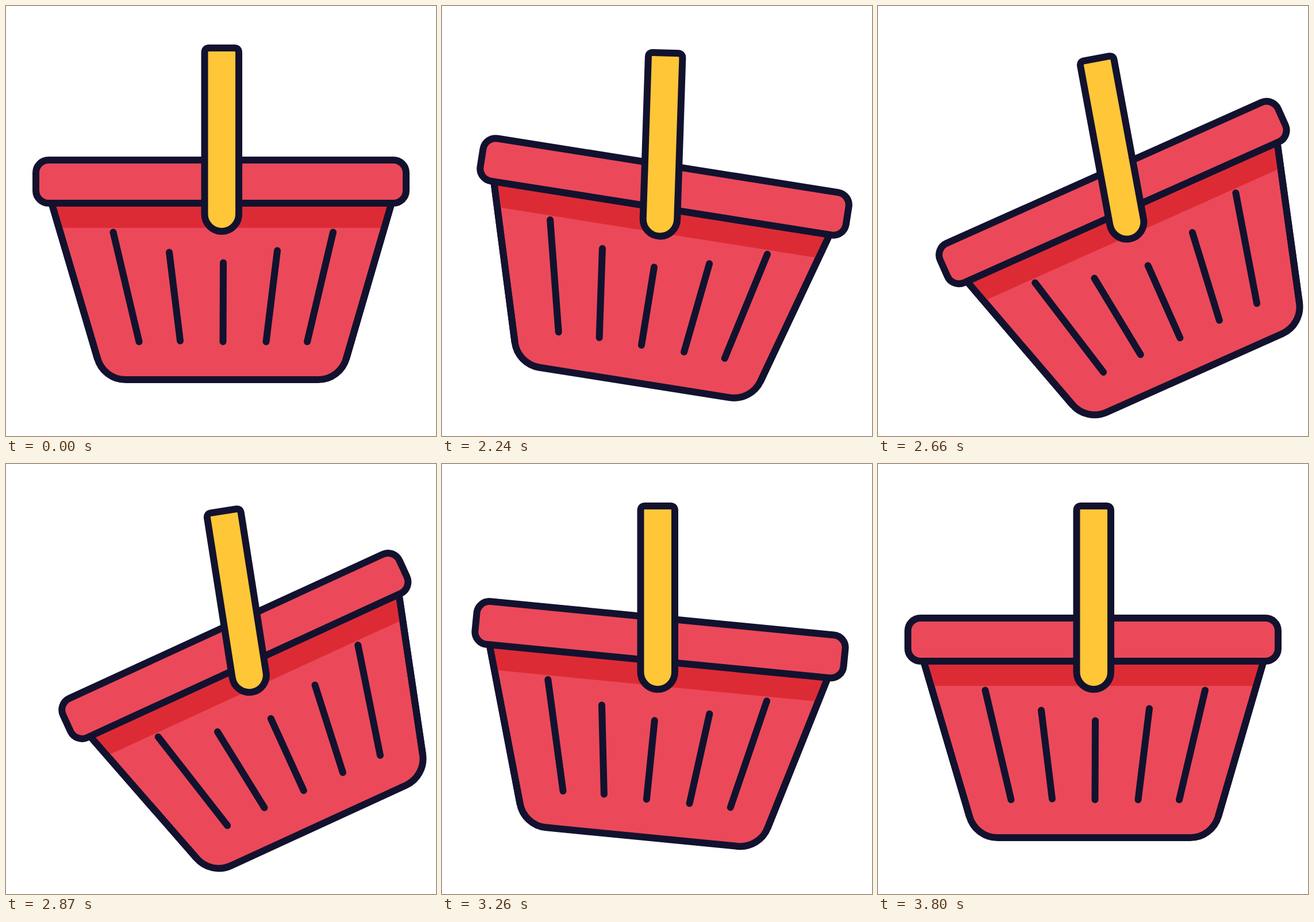
These frames come from a looping animation (748 px wide and 748 px high, 3830 ms). An HTML page:

```html
<!DOCTYPE html>
<html lang="en">
<head>
<meta charset="utf-8">
<title>Basket</title>
<style>
  html, body { margin: 0; height: 100%; overflow: hidden; background: #fff; }
  svg { display: block; width: 100vw; height: 100vh; }
</style>
</head>
<body>
<svg viewBox="0 0 748 748" stroke="#12122f" stroke-width="12" stroke-linecap="round" stroke-linejoin="round">
  <g id="basket" fill="#eb4959">
    <path d="M80 345L159 613A51 51 0 0 0 208 650H543A51 51 0 0 0 592 613L670 345Z"/>
    <path d="M80 345H670L658 386H92Z" fill="#dd2b36" stroke="none"/>
    <path d="M80 345L159 613M670 345L592 613" fill="none"/>
    <path d="M186.5 393.5L231.5 584M284 428.5L303 582.5M378 446.5L377.5 584M472 425.5L452.5 584M569 393.5L524 584"/>
    <rect x="52" y="268" width="644" height="75" rx="22"/>
  </g>
  <path id="handle" fill="#ffc638" d="M345.5 362V81Q345.5 73 353.5 73H397Q405 73 405 81V362A29.75 30 0 0 1 345.5 362Z"/>
</svg>
<script>
const LOOP = 3830, START = 2000, STEP = 30;
const PIVOT = [375.5, 362];

// Tracks are [step, value] keys joined by ease-in-out.
const tracks = {
  x: [[4.8, 0], [24.5, 60], [40, 0]],
  y: [[0, 0], [16, 17], [36.5, 0]],
  handle: [[0, 0], [7, 2], [24, -11], [42, 0]],
  basket: [[0, 0], [8, 9], [23.5, -25], [28, -25], [46, 10], [60, 0]]
};

function sample(keys, n) {
  const i = keys.findIndex(k => k[0] > n);
  if (i === 0) return keys[0][1];
  if (i < 0) return keys[keys.length - 1][1];
  const [a, from] = keys[i - 1], [b, to] = keys[i];
  const p = (n - a) / (b - a);
  return from + (to - from) * p * p * (3 - 2 * p);
}

function draw() {
  const t = performance.now() % LOOP;
  const n = Math.max(0, Math.floor((t - START) / STEP));
  const at = name => sample(tracks[name], n);
  for (const id of ["basket", "handle"]) {
    document.getElementById(id).setAttribute("transform",
      `translate(${at("x")} ${at("y")}) rotate(${at(id)} ${PIVOT})`);
  }
  requestAnimationFrame(draw);
}
draw();
</script>
</body>
</html>
```
